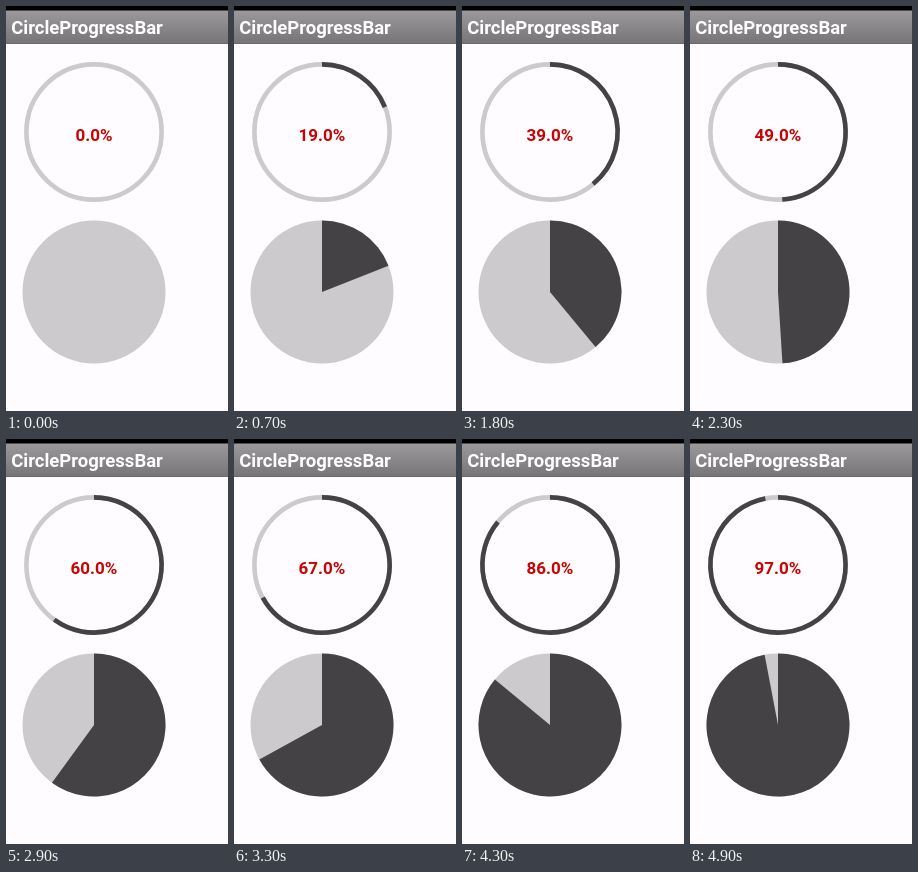
Animation, 222 px wide and 405 px high, one loop 5000 ms. Source, as an HTML page:

```html
<!DOCTYPE html>
<html lang="en">
<head>
<meta charset="utf-8">
<title>CircleProgressBar</title>
<style>
html, body { margin: 0; width: 100%; height: 100%; overflow: hidden; background: #fefcfe; }
svg { display: block; width: 222px; height: 405px; }
text { font-family: Roboto, sans-serif; font-weight: 700; }
</style>
</head>
<body>
<svg viewBox="0 0 222 405">
  <defs>
    <linearGradient id="bar" x1="0" y1="0" x2="0" y2="1">
      <stop offset="0" stop-color="#9b999b"/>
      <stop offset="1" stop-color="#767476"/>
    </linearGradient>
  </defs>
  <rect width="222" height="5" fill="#000"/>
  <rect y="4.5" width="222" height="33.5" fill="url(#bar)"/>
  <rect y="37" width="222" height="1" fill="#6c6a6c"/>
  <text x="5.2" y="28" font-size="18.5" fill="#fff">CircleProgressBar</text>

  <circle cx="88" cy="126" r="67.6" fill="none" stroke="#cccacc" stroke-width="4.6"/>
  <path id="ring" fill="none" stroke="#444244" stroke-width="4.6"/>
  <text id="label" x="88" y="135" font-size="17" fill="#c80404" text-anchor="middle">0.0%</text>

  <circle cx="88" cy="286" r="71.5" fill="#cccacc"/>
  <path id="pie" fill="#444244"/>
</svg>
<script>
const LOOP = 5000, STEP = 100;
const get = id => document.getElementById(id);
const ring = get('ring'), pie = get('pie'), label = get('label');

// Clockwise arc from twelve o'clock
function arc(cx, cy, r, percent) {
  const a = percent / 100 * 2 * Math.PI;
  const x = cx + r * Math.sin(a), y = cy - r * Math.cos(a);
  return `M${cx} ${cy - r}A${r} ${r} 0 ${percent > 50 ? 1 : 0} 1 ${x} ${y}`;
}

// Starts empty, then climbs steadily after a first jump
function progress(step) {
  return step ? Math.round(6 + step * 13 / 7) : 0;
}

function draw(percent) {
  ring.setAttribute('d', percent ? arc(88, 126, 67.6, percent) : '');
  pie.setAttribute('d', percent ? arc(88, 286, 71.5, percent) + 'L88 286Z' : '');
  label.textContent = percent.toFixed(1) + '%';
}

const start = performance.now();
function tick() {
  const t = Math.max(0, performance.now() - start) % LOOP;
  draw(progress(Math.floor(t / STEP)));
  requestAnimationFrame(tick);
}
tick();
</script>
</body>
</html>
```
